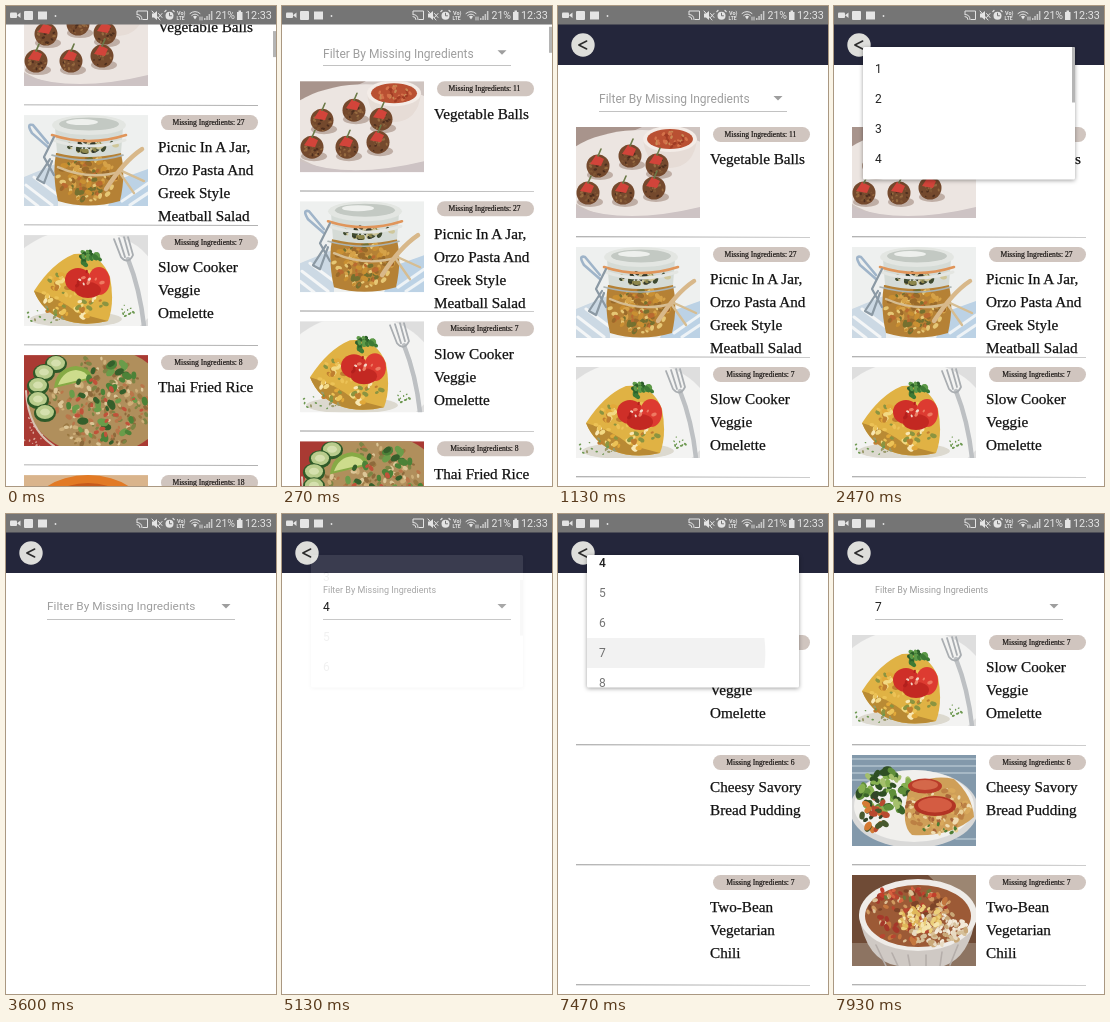
An HTML page that plays this animation: 270 px wide and 480 px high, repeating every 8000 ms.

```html
<!DOCTYPE html>
<html lang="en">
<head>
<meta charset="utf-8">
<title>Recipe filter</title>
<style>
html, body { margin: 0; width: 100%; height: 100%; overflow: hidden; background: #fff; }
svg { display: block; width: 100%; height: 100%; }
text { font-family: Roboto, "Noto Sans", sans-serif; }
.dish { font: 15.2px "Liberation Serif", "Noto Serif", serif; fill: #111; stroke: #111; stroke-width: .25px; }
.badge { font: 7.6px "Liberation Serif", "Noto Serif", serif; fill: #1a1614; stroke: #1a1614; stroke-width: .2px; text-anchor: middle; }
.num { font-size: 12px; }
#sheet { filter: drop-shadow(0 1.5px 2px rgba(0, 0, 0, .38)); }
</style>
</head>
<body>
<svg id="stage" viewBox="0 0 270 480" preserveAspectRatio="none"></svg>
<script>
const LOOP = 8000;

// ---- drawing helpers
const el = (x, y, rx, ry, fill, extra = '') =>
  `<ellipse cx="${x}" cy="${y}" rx="${rx}" ry="${ry}" fill="${fill}" ${extra}/>`;
const box = (x, y, w, h, fill, extra = '') =>
  `<rect x="${x}" y="${y}" width="${w}" height="${h}" fill="${fill}" ${extra}/>`;
const shape = (d, fill) => `<path d="${d}" fill="${fill}"/>`;
const line = (d, color, w) =>
  `<path d="${d}" fill="none" stroke="${color}" stroke-width="${w}" stroke-linecap="round" stroke-linejoin="round"/>`;

function scatter(seed, n, cx, cy, rx, ry, size, colors) {
  const rnd = () => (seed = (seed * 16807) % 2147483647) / 2147483647;
  let out = '';
  for (let i = 0; i < n; i++) {
    const a = rnd() * Math.PI * 2, r = Math.sqrt(rnd());
    const x = (cx + Math.cos(a) * r * rx).toFixed(1), y = (cy + Math.sin(a) * r * ry).toFixed(1);
    const s = size * (.6 + rnd() * .7);
    out += el(x, y, s.toFixed(1), (s * .65).toFixed(1), colors[i % colors.length],
      `transform="rotate(${Math.round(rnd() * 180)} ${x} ${y})"`);
  }
  return out;
}

// ---- dish pictures, 124 x 91
const pictures = {
  balls() {
    const spots = [[54, 29], [81, 38], [22, 39], [78, 61], [12, 66], [47, 66]];
    return box(0, 0, 124, 91, '#cfc4c0') + shape('M0 0H66L0 30Z', '#a8948c') +
      el(66, 48, 86, 45, '#ece5e1') + shape('M0 80Q50 98 124 80V91H0Z', '#cdc3c4') +
      shape('M67 12Q70 40 94 41Q118 40 121 12Z', '#e6dcd6') +
      el(94, 12, 27, 13, '#f3ece7') + el(94, 12, 23, 10, '#b95032') +
      scatter(5, 34, 94, 12, 20, 8, 1.9, ['#d4724a', '#a03c24', '#c98a55']) +
      spots.map(([x, y], i) =>
        el(x + 2, y + 9, 13, 5, '#bfaea5') + el(x, y, 11.5, 11.5, '#74492d') +
        scatter(i + 11, 20, x, y + 2, 9.5, 8, 1.5, ['#966a40', '#4d2e1e', '#7f5634']) +
        shape(`M${x - 8} ${y - 2}L${x - 2} ${y - 11}L${x + 6} ${y - 7}L${x + 3} ${y}Z`, '#d2443a') +
        line(`M${x} ${y - 10}l3 -7`, '#6b7a48', 1.6)).join('');
  },
  jar() {
    return box(0, 0, 124, 91, '#eef0ef') + shape('M0 62L34 48V91H0Z', '#ccd9e4') +
      line('M2 70L28 90M0 80L14 91M10 62L34 80', '#f4f6f7', 3) +
      shape('M96 64L124 54V91H84Z', '#bcd2e5') + line('M98 86L124 68M106 90L124 78', '#eef3f6', 3) +
      line('M24 32L8 18Q2 8 9 10L24 28', '#9fb4c9', 2.6) +
      shape('M32 38Q28 60 34 86Q64 95 96 86Q102 60 97 38Z', '#b58135') +
      scatter(21, 110, 65, 63, 31, 23, 3, ['#d6a248', '#9a6a2a', '#e6c775', '#75702f', '#ba6a30', '#c98f32']) +
      shape('M31 12H99L97 38Q64 46 33 38Z', '#d5dbd6') +
      scatter(8, 36, 65, 31, 29, 6, 3, ['#3f4a30', '#8d874c', '#cfc79a', '#32372a']) +
      el(65, 10, 37, 10, '#e3e6e2') + el(65, 9, 30, 6.5, '#c3c9c3') + el(58, 7, 16, 3, '#eef0ed') +
      line('M28 20Q65 32 102 20', '#e0955a', 2.6) + line('M29 25Q65 37 101 25', '#e4e6e2', 3) +
      line('M28 40Q65 50 99 40', '#aab3b3', 1.6) +
      line('M30 22L20 42L30 60M26 44L13 64L20 68L28 46', '#8b99a4', 2.2) +
      line('M34 52Q66 66 98 56L120 66M96 58L110 78', '#d6bd92', 2.4) +
      line('M82 74Q100 46 118 34', '#d8b88a', 4.5);
  },
  omelette() {
    return box(0, 0, 124, 91, '#dedede') + el(58, 52, 78, 58, '#f3f3f2') +
      el(52, 84, 46, 8, '#dcd9cf') +
      line('M104 24Q116 54 120 91', '#bdc0c3', 4.5) +
      line('M90 4L97 22Q104 30 109 20L104 2M95 3L101 22M100 2L105 20', '#a9adb1', 1.8) +
      shape('M10 56Q28 28 50 19Q76 16 86 42Q91 68 84 86Q58 92 38 84Q18 76 10 56Z', '#e0b244') +
      shape('M10 56Q34 62 54 78L84 86Q58 92 38 84Q18 76 10 56Z', '#b98a34') +
      scatter(31, 90, 50, 60, 34, 25, 2.8, ['#f3d983', '#ecc256', '#8b9440', '#bf7f30', '#f8e8b4', '#e2a93a']) +
      el(54, 45, 13, 12, '#cf2f28') + el(75, 46, 11, 14, '#dd3b31') + el(64, 55, 13, 8, '#c32822') +
      scatter(32, 10, 64, 44, 17, 8, 2.2, ['#ee7a62', '#f2d8c8', '#b3201d']) +
      scatter(7, 20, 65, 24, 11, 8, 3.4, ['#3d7a35', '#5d9a48', '#2c5f2a']) +
      scatter(17, 18, 22, 80, 20, 9, 1.4, ['#6c9850', '#9a9a6a']) +
      scatter(19, 10, 98, 78, 12, 10, 1.3, ['#6c9850']);
  },
  rice() {
    const slices = [[32, 9], [20, 18], [14, 31], [14, 45], [21, 58]];
    return box(0, 0, 124, 91, '#a93a33') +
      scatter(40, 30, 8, 76, 14, 20, 1.2, ['#d9a79a']) + el(74, 46, 70, 54, '#b08f5c') +
      scatter(41, 210, 74, 48, 52, 46, 2.6, ['#cdae78', '#9a7842', '#dcc697', '#8d6a3c', '#b9764a', '#7d8444']) +
      line('M2 36Q4 74 30 91', '#d8c2b2', 2) +
      slices.map(([x, y]) => el(x, y, 11, 9, '#2f5a28') + el(x, y - 1, 9, 7, '#b9cc8c') +
        el(x, y - 1, 5, 3.5, '#d5e0ae')).join('') +
      shape('M30 33Q32 13 52 11Q68 13 68 24Z', '#86aa45') + shape('M34 30Q39 16 52 15Q63 16 64 23Z', '#cddc8c') +
      scatter(14, 44, 84, 46, 40, 42, 4.4, ['#4c8238', '#6a9c4a', '#355f2b']) +
      scatter(15, 18, 80, 55, 38, 34, 2.6, ['#c0523a']);
  },
  soup() {
    return box(0, 0, 124, 91, '#d9b48c') + el(64, 42, 60, 42, '#e27a25') +
      el(64, 42, 50, 34, '#c65a1c') +
      scatter(51, 60, 64, 42, 46, 30, 4, ['#f0a04a', '#a63f18', '#e7c07c', '#6f8a3a']);
  },
  pudding() {
    return box(0, 0, 124, 91, '#8399ab') +
      line('M0 4H124M0 11H124M0 18H124M0 25H20M104 84H124', '#b3c2ce', 1.6) +
      el(62, 54, 64, 39, '#d9d9d8') + el(62, 51, 60, 36, '#f1f0ed') +
      scatter(61, 70, 36, 36, 29, 22, 4.6, ['#5f8f3a', '#86b050', '#3a6428', '#a5c06c', '#2f4f24']) +
      scatter(62, 26, 22, 57, 15, 18, 3.8, ['#d47a34', '#b84a30', '#47592e', '#33452a']) +
      shape('M56 38Q72 18 102 24Q120 40 122 62Q100 82 60 80Q48 70 56 38Z', '#cf9f58') +
      scatter(63, 100, 86, 56, 32, 23, 3, ['#ead098', '#bc8044', '#efdcb2', '#a8653a', '#d9a95c']) +
      el(73, 31, 17, 7.5, '#b93c2a') + el(73, 30, 13, 5, '#d4684a') +
      el(83, 51, 21, 10, '#b23424') + el(83, 50, 17, 7.5, '#d45c42') +
      scatter(64, 8, 90, 74, 20, 5, 2, ['#4d7d34']);
  },
  chili() {
    return box(0, 0, 124, 91, '#6f4b36') + shape('M76 0H124V46Z', '#9c8672') +
      shape('M0 68H124V91H0Z', '#8d7462') +
      shape('M7 40Q14 86 46 91H92Q118 82 124 40Z', '#cfc9c4') +
      line('M24 70L34 91M40 78L46 91M56 80L58 91M74 80V91M90 77L88 91M106 70L98 90', '#b5aeaa', 1.6) +
      el(66, 40, 59, 36, '#efece8') + el(66, 41, 53, 31, '#9c5a36') +
      scatter(71, 120, 60, 40, 46, 28, 3.2, ['#b84630', '#7d4428', '#cf9a60', '#dcc096', '#a5382a', '#c4773f']) +
      scatter(72, 90, 86, 54, 28, 17, 2.8, ['#e8dac2', '#d6c09a', '#f3eada', '#c9a878']) +
      scatter(73, 60, 68, 44, 22, 14, 2.8, ['#ecd07c', '#e0b75a', '#f5e5ac']) +
      scatter(74, 18, 54, 20, 32, 7, 2.6, ['#c23f2c', '#d8603f', '#6c7a3a']);
  }
};

// ---- recipe rows
const omelette = ['omelette', 7, 'Slow Cooker', 'Veggie', 'Omelette'];
const before = [
  ['balls', 11, 'Vegetable Balls'],
  ['jar', 27, 'Picnic In A Jar,', 'Orzo Pasta And', 'Greek Style', 'Meatball Salad'],
  omelette,
  ['rice', 8, 'Thai Fried Rice'],
  ['soup', 18, 'Pumpkin Soup']
];
const after = [
  omelette,
  ['pudding', 6, 'Cheesy Savory', 'Bread Pudding'],
  ['chili', 7, 'Two-Bean', 'Vegetarian', 'Chili']
];

const row = ([pic, missing, ...lines], i) => `<g transform="translate(0 ${121 + i * 120})">
  <g class="pic" transform="translate(18 0)" clip-path="url(#frame)">${pictures[pic]()}</g>
  ${box(155, 0, 97, 15, '#d0c5bf', 'rx="7.5"')}
  <text class="badge" x="202.5" y="10">Missing Ingredients: ${missing}</text>
  ${lines.map((s, k) => `<text class="dish" x="152" y="${37.3 + k * 23}">${s}</text>`).join('')}
  <path d="M18 109.300L252 110V110.600L18 110.200Z" fill="#999"/></g>`;

const numbers = Array.from({ length: 10 }, (_, i) =>
  `<text class="num" x="41" y="${67.3 + i * 30}">${i + 1}</text>`).join('');

const statusBar = box(0, 0, 270, 18.5, '#757575') + `<g fill="#e4e4e4">
  <rect x="4" y="6.5" width="7" height="5.5" rx="1"/><path d="M11 9.2L14.5 6.5V12Z"/>
  <rect x="18" y="5" width="9" height="9" rx="1"/><rect x="32" y="5.5" width="9" height="8"/>
  <circle cx="49.5" cy="10" r=".9"/>
  <path d="M146 7.500H148L151 5V14L148 11.500H146Z"/>
  <circle cx="163.500" cy="9.700" r="4"/>
  <text x="171" y="8.700" font-size="5.500" font-weight="700">Vo)</text>
  <text x="170.500" y="13.700" font-size="5" font-weight="700">LTE</text>
  <path d="M187 10.500Q189 9 191 10.500L189 13.500Z"/>
  <path d="M198 14V12H199.500V14ZM200.300 14V10H201.800V14ZM202.600 14V8H204.100V14ZM204.900 14V5H206.400V14Z" opacity=".75"/>
  <text x="209.500" y="13.300" font-size="10.500">21%</text>
  <path d="M231 6H232.500V4.500H235V6H236.500V14H231Z"/>
  <text x="239" y="13.300" font-size="10.800">12:33</text></g>` +
  line('M184 7.500Q189 3.500 194 7.500M185.700 9.500Q189 6.500 192.300 9.500', '#e4e4e4', 1) +
  line('M131 8V5H141.500V13.500H137M131 10.500Q134 10.500 134 13.500M131 8.500Q136 8.500 136 13.500', '#e4e4e4', 1) +
  line('M152.500 7.500L156 11.500M156 7.500L152.500 11.500M146 5L154 14', '#e4e4e4', 1) +
  line('M163.500 7.200V9.800H165.500', '#757575', 1) +
  line('M160 4.500L158.800 5.700M167 4.500L168.200 5.700', '#e4e4e4', 1.2) +
  line('M194 11V14M196 11V14', '#e4e4e4', .9);

document.getElementById('stage').innerHTML = `
<defs>
  <clipPath id="frame"><rect width="124" height="91"/></clipPath>
  <clipPath id="field"><rect x="41" y="71" width="188" height="41"/></clipPath>
  <clipPath id="panel"><rect x="29" y="41" width="212" height="132.5" rx="1.5"/></clipPath>
  <clipPath id="item"><rect x="29" y="124" width="212" height="30"/></clipPath>
</defs>
${box(0, 0, 270, 480, '#fff')}
<g id="page">
  ${box(0, 18, 270, 41, '#24263b')}
  ${el(25, 39, 11.7, 11.7, '#dededb')}${line('M28.7 35L20.8 39L28.7 43', '#2b2b2b', 1.5)}
  <text id="label" font-size="12" fill="#9e9e9e">Filter By Missing Ingredients</text>
  <text id="value" class="num" x="41" y="97.3" fill="#212121"></text>
  <path d="M215.5 90H224.5L220 94.5Z" fill="#9e9e9e"/>
  ${box(41, 105, 188, .7, '#a8a8a8')}
  <g clip-path="url(#field)"><circle id="fieldWave" cx="150" cy="93"/></g>
  <g id="before">${before.map(row).join('')}</g>
  <g id="after">${after.map(row).join('')}</g>
</g>
<rect id="pageBar" x="267" width="3" height="26" fill="#b4b4b4"/>
<g id="sheet">
  ${box(29, 41, 212, 132.5, '#fff', 'rx="1.5"')}
  <g clip-path="url(#panel)">
    <g id="items">${numbers}</g>
    <g clip-path="url(#item)" id="itemRow"><circle id="itemWave" cx="90" cy="139"/></g>
    <rect id="sheetBar" x="238" width="3" height="55.5" fill="#b5b5b5"/>
  </g>
</g>
${statusBar}`;

// ---- motion
const $ = id => document.getElementById(id);
const set = (id, attrs) => { for (const k in attrs) $(id).setAttribute(k, attrs[k]); };
const span = (t, a, b) => Math.min(1, Math.max(0, (t - a) / (b - a)));
const inOut = p => p < .5 ? 2 * p * p : 1 - 2 * (1 - p) * (1 - p);
const out = p => 1 - (1 - p) * (1 - p);

const scroll = [[0, -132], [70, -124], [200, -72], [330, -24], [460, 0], [530, 2], [700, 1.5], [870, 0]];
function track(keys, t) {
  for (let i = 1; i < keys.length; i++) {
    const [a, x] = keys[i - 1], [b, y] = keys[i];
    if (t < b) return x + (y - x) * span(t, a, b);
  }
  return keys[keys.length - 1][1];
}

function wave(id, t, start, radius) {
  const p = out(span(t, start, start + 400));
  set(id, { r: radius * p, opacity: t < start ? 0 : .2 * (1 - p) });
}

function draw(t) {
  const y = track(scroll, t);
  set('page', { transform: `translate(0 ${y.toFixed(2)})` });
  set('pageBar', { y: 18.5 - y * .05, opacity: 1 - span(t, 330, 500) });

  const up = inOut(span(t, 3560, 3800));
  set('label', { transform: `translate(41 ${97.4 - 18.3 * up}) scale(${1 - .25 * up})` });
  $('value').textContent = t < 3680 ? '' : t < 7450 ? '4' : '7';

  set('before', { opacity: t < 3130 ? 1 : 0 });
  set('after', { opacity: t < 7400 ? 0 : 1 });
  $('after').querySelectorAll('.pic').forEach((p, i) =>
    p.setAttribute('opacity', span(t, 7670 + i * 40, 7760 + i * 40)));

  const second = t > 4000;
  wave('fieldWave', t, second ? 4730 : 1800, 125);
  wave('itemWave', t, second ? 7270 : 2870, 156);
  set('itemRow', { transform: `translate(0 ${second ? 0 : 14})` });

  const shown = second
    ? inOut(span(t, 5090, 5270)) - inOut(span(t, 7500, 7700))
    : inOut(span(t, 2070, 2290)) - inOut(span(t, 3340, 3560));
  set('sheet', { opacity: shown, display: shown > 0 ? 'inline' : 'none' });

  const offset = second ? 60 + 44 * out(span(t, 5530, 6200)) : 0;
  set('items', { transform: `translate(0 ${-offset})` });
  set('sheetBar', {
    y: 41 + offset * .418,
    opacity: 1 - (second ? span(t, 6600, 6800) : span(t, 2480, 2600))
  });
  [...$('items').children].forEach((n, i) => {
    const chosen = second && i === 3;
    n.setAttribute('fill', second && !chosen ? '#757575' : '#212121');
    n.setAttribute('font-weight', chosen ? 500 : 400);
  });
}

const begin = performance.now();
function tick() {
  draw((performance.now() - begin) % LOOP);
  requestAnimationFrame(tick);
}
tick();
</script>
</body>
</html>
```
